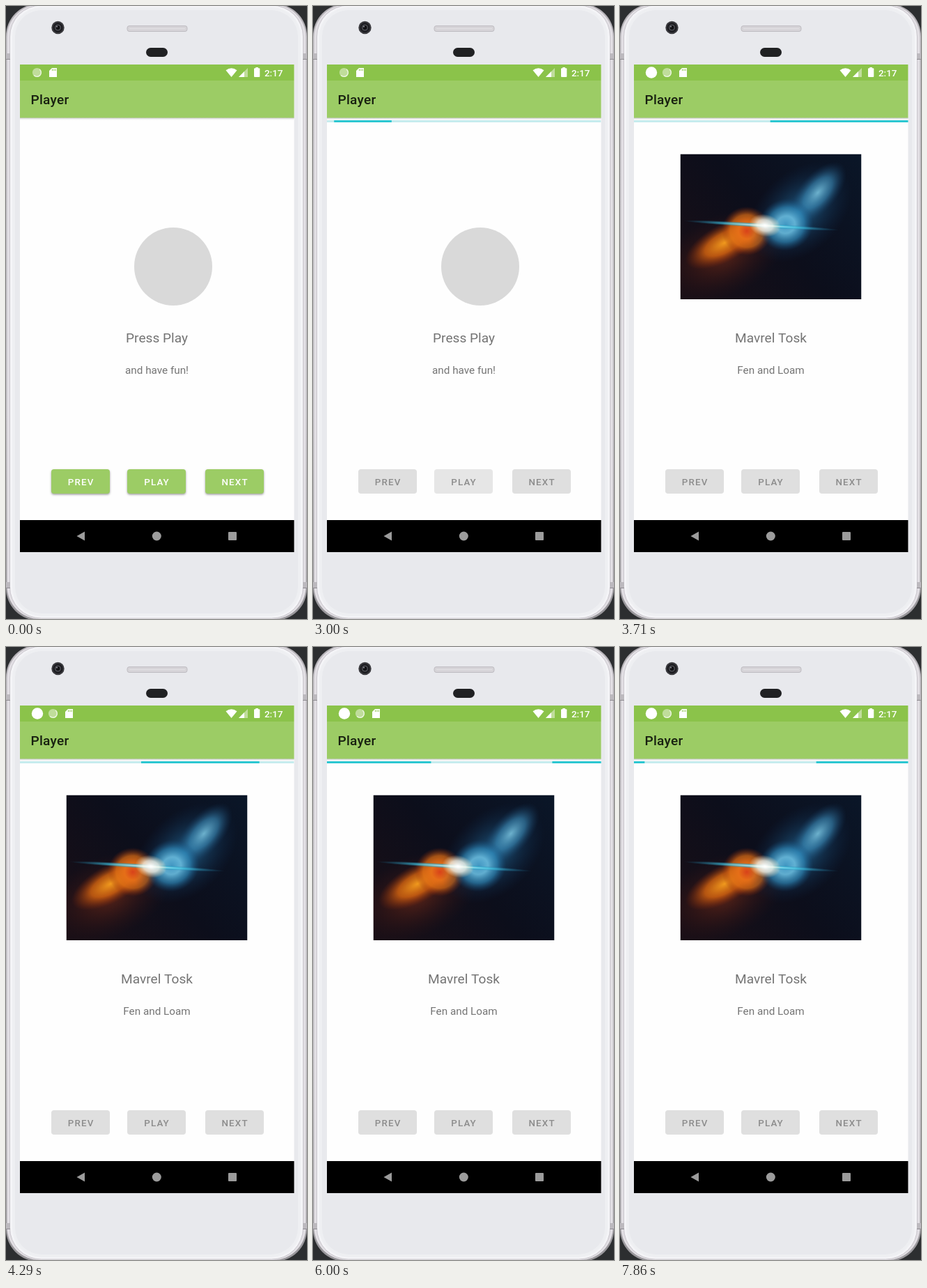
Animation of 432x880 px, one loop 8 s. Source, as an HTML page with a canvas:

```html
<!DOCTYPE html>
<html lang="en">
<head>
<meta charset="utf-8">
<title>Player</title>
<style>
  html, body { margin: 0; width: 100%; height: 100%; overflow: hidden; background: #2c2e30; }
  canvas { display: block; width: 432px; height: 880px; }
</style>
</head>
<body>
<canvas id="stage" width="432" height="880"></canvas>
<script>
const ctx = document.getElementById('stage').getContext('2d');
const LOOP = 8000, LOADING = 3000, LOADED = 3140, NOTICE = 3430;
const LEFT = 20, WIDE = 393.5;
const FONT = 'Roboto, "Noto Sans", sans-serif';

function rect(x, y, w, h, fill) {
  ctx.fillStyle = fill;
  ctx.fillRect(x, y, w, h);
}

function round(x, y, w, h, r, fill, stroke) {
  ctx.beginPath();
  ctx.roundRect(x, y, w, h, r);
  ctx.fillStyle = fill;
  ctx.fill();
  if (stroke) { ctx.strokeStyle = stroke; ctx.lineWidth = 1; ctx.stroke(); }
}

function disc(x, y, r, fill) {
  ctx.beginPath();
  ctx.arc(x, y, r, 0, Math.PI * 2);
  ctx.fillStyle = fill;
  ctx.fill();
}

function poly(fill, ...pts) {
  ctx.beginPath();
  for (let i = 0; i < pts.length; i += 2) ctx.lineTo(pts[i], pts[i + 1]);
  ctx.closePath();
  ctx.fillStyle = fill;
  ctx.fill();
}

function text(str, x, y, size, fill, { weight = 400, align = 'center', spacing = 0 } = {}) {
  ctx.font = `${weight} ${size}px ${FONT}`;
  ctx.letterSpacing = spacing + 'px';
  ctx.textAlign = align;
  ctx.fillStyle = fill;
  ctx.fillText(str, x + spacing / 2, y);
  ctx.letterSpacing = '0px';
}

function blend(gradient, ...stops) {
  stops.forEach((c, i) => gradient.addColorStop(i / (stops.length - 1), c));
  return gradient;
}

// Soft elliptical light
function glow(x, y, rx, ry, turn, ...stops) {
  ctx.save();
  ctx.translate(x, y);
  ctx.rotate(turn);
  ctx.scale(rx, ry);
  disc(0, 0, 1, blend(ctx.createRadialGradient(0, 0, 0, 0, 0, 1), ...stops));
  ctx.restore();
}

const bez = (a, b, c, d, s) => {
  const q = 1 - s;
  return a * q * q * q + 3 * b * q * q * s + 3 * c * q * s * s + d * s * s * s;
};

// Easing made of joined cubic pieces: x,y of start, then two handles and an end per piece
function curve(...p) {
  return x => {
    let i = 0;
    while (i + 8 < p.length && x > p[i + 6]) i += 6;
    let lo = 0, hi = 1;
    for (let n = 0; n < 24; n++) {
      const mid = (lo + hi) / 2;
      if (bez(p[i], p[i + 2], p[i + 4], p[i + 6], mid) < x) lo = mid; else hi = mid;
    }
    return bez(p[i + 1], p[i + 3], p[i + 5], p[i + 7], lo);
  };
}

function through(v, ...stops) {
  let i = 0;
  while (i + 4 < stops.length && v > stops[i + 2]) i += 2;
  const k = (v - stops[i]) / (stops[i + 2] - stops[i]);
  return stops[i + 1] + (stops[i + 3] - stops[i + 1]) * k;
}

const moveA = curve(0, 0, .067, 0, .133, 0, .2, 0, .3958, 0, .4748, .2068, .5915, .4171,
  .7152, .6394, .8163, .9746, 1, 1);
const sizeA = curve(0, 0, .12, 0, .24, 0, .3665, 0, .4725, .0624, .6154, .5, .6833, .5,
  .7548, .5, .7573, .8145, 1, 1);
const moveB = curve(0, 0, .0375, 0, .1288, .0895, .25, .2186, .3224, .2956, .4367, .4176,
  .4833, .4898, .69, .8097, .7933, .95, 1, 1);
const sizeB = curve(0, 0, .0683, .0199, .1922, .1586, .3333, .3493, .3841, .4148, .5495, .6814,
  .6667, .6828, .7526, .6818, .7373, .8789, 1, 1);

function progress(t) {
  const phase = (t / 2000 + .6395) % 1;
  const y = 164, h = 3;
  const bar = (center, scale) => {
    const w = scale * .8 * WIDE;
    rect(LEFT + center * WIDE - w / 2, y, w, h, '#2cc7d1');
  };
  ctx.save();
  ctx.beginPath();
  ctx.rect(LEFT, y, WIDE, h);
  ctx.clip();
  rect(LEFT, y, WIDE, h, '#c6ecee');
  bar(-.9517 + 2.0061 * moveA(phase), through(sizeA(phase), 0, .1, .5, .827, 1, .1));
  bar(-.0489 + 1.7228 * moveB(phase), through(sizeB(phase), 0, .1, .3493, .612, .6828, .935, 1, .1));
  ctx.restore();
}

function phone() {
  rect(0, 0, 432, 880, '#2c2e30');
  const rim = blend(ctx.createLinearGradient(0, 0, 0, 880), '#b4b1b6', '#bdbabf', '#bdbabf', '#98969a');
  round(0, -3, 432, 885, 46, rim);
  round(1.5, -2, 429, 882, 47, '#e2dfe4');
  round(5.5, -1, 421, 880, 45, '#f4f4f7', '#c9c6cc');
  round(9, 2, 414, 874, 42, '#eeeff2');
  round(13, 6, 406, 866, 38, '#e8e9ed');
  for (const y of [68, 827]) {
    for (const x of [0, 426]) {
      rect(x, y, 6, 9, '#bcb9be');
      rect(x, y + 8, 6, 1, '#8f8c92');
    }
  }
  disc(74.5, 31, 9.2, '#3a3a3e');
  disc(74.5, 31, 7, '#1c1c20');
  disc(74.5, 31, 4.6, '#4b4c52');
  disc(74.5, 31, 3, '#111114');
  disc(73, 29.5, 1, '#9a9ca4');
  round(174, 28.5, 86, 8, 3, '#d6d4d8', '#bebcc1');
  rect(177, 32, 80, 1, '#e2e0e4');
  round(201, 60, 31, 13, 6.5, '#202123');
}

function sdCard(x) {
  poly('#fff', x + 4, 89, x + 11, 89, x + 11, 102, x, 102, x, 93);
  for (let i = 0; i < 3; i++) rect(x + 4 + i * 2.3, 90.5, 1, 2.5, '#8bc34a');
}

function dial(x) {
  disc(x, 95.5, 6.6, '#c0dd9b');
  ctx.beginPath();
  ctx.arc(x, 95.5, 5.8, -.9, 2.4);
  ctx.lineWidth = 1.3;
  ctx.strokeStyle = '#eef6e4';
  ctx.stroke();
}

function statusBar(notice) {
  rect(LEFT, 84, WIDE, 23, '#8bc34a');
  const dx = notice ? 23 : 0;
  if (notice) disc(45, 95.5, 8.2, '#fff');
  dial(44.5 + dx);
  sdCard(62 + dx);

  ctx.beginPath();
  ctx.moveTo(323.5, 102);
  ctx.lineTo(315.5, 92.3);
  ctx.quadraticCurveTo(323.5, 86.4, 331.5, 92.3);
  ctx.closePath();
  ctx.fillStyle = '#fff';
  ctx.fill();

  poly('#c0dd9b', 334, 102, 347, 102, 347, 89);
  poly('#fff', 334, 102, 342, 102, 342, 94);
  rect(358.3, 88, 3.6, 2, '#fff');
  round(356, 89.3, 8.3, 12.7, 1, '#fff');
  text('2:17', 371, 101, 13.4, '#fff', { weight: 500, align: 'left' });
}

function toolbar() {
  rect(LEFT, 160, WIDE, 4, blend(ctx.createLinearGradient(0, 160, 0, 164), '#bdbdbd', '#ececec', '#fefefe'));
  rect(LEFT, 107, WIDE, 53.5, '#9ccc65');
  text('Player', 35.4, 141, 19.1, '#182010', { weight: 500, align: 'left', spacing: .24 });
}

function cover() {
  const x = 86.5, y = 212.5, w = 260, h = 208.5;
  ctx.save();
  ctx.beginPath();
  ctx.rect(x, y, w, h);
  ctx.clip();
  rect(x, y, w, h, blend(ctx.createLinearGradient(x, y + h, x + w, y), '#1a0f16', '#0c0e1b', '#0a1628'));
  // Embers and fire
  glow(148, 358, 92, 58, -.4, 'rgba(140,50,22,.6)', 'rgba(60,20,20,0)');
  glow(150, 340, 62, 27, -.5, 'rgba(250,160,30,.95)', 'rgba(222,105,15,.75)', 'rgba(140,40,10,0)');
  glow(182, 323, 36, 35, .2, '#d8421a', 'rgba(232,112,24,.95)', 'rgba(225,110,20,.7)', 'rgba(150,40,10,0)');
  // Ice and spray
  glow(258, 296, 86, 58, -.75, 'rgba(40,125,175,.75)', 'rgba(15,50,90,0)');
  glow(284, 268, 54, 27, -.85, 'rgba(125,200,228,.85)', 'rgba(60,140,185,.6)', 'rgba(20,60,100,0)');
  glow(238, 314, 40, 37, -.4, 'rgba(70,160,205,.9)', 'rgba(110,195,230,.85)', 'rgba(50,145,195,.6)', 'rgba(20,80,130,0)');
  // Flare
  glow(203, 315, 112, 3.5, .06, '#dff8ff', 'rgba(60,190,220,.75)', 'rgba(30,120,160,0)');
  glow(208, 315, 23, 16, .2, '#fff', 'rgba(255,250,235,.75)', 'rgba(255,220,170,0)');
  ctx.restore();
}

function button(label, x, fill, active) {
  ctx.save();
  if (active) {
    ctx.shadowColor = 'rgba(0,0,0,.38)';
    ctx.shadowBlur = 3;
    ctx.shadowOffsetY = 1.5;
  }
  round(x, 665, 84, 35, 4, fill);
  ctx.restore();
  text(label, x + 42, 688, 13.37, active ? '#fff' : '#8c8c8c', { weight: 500, spacing: 1.19 });
}

function navBar() {
  rect(LEFT, 738, WIDE, 46, '#000');
  poly('#9c9c9c', 101.5, 761, 113, 754.5, 113, 767.5);
  disc(216.3, 761, 6.5, '#9c9c9c');
  round(319, 755, 12, 12, 1, '#9c9c9c');
}

function draw(t) {
  const loading = t >= LOADING, loaded = t >= LOADED;
  phone();
  rect(LEFT, 84, WIDE, 700, '#fefefe');
  statusBar(t >= NOTICE);
  toolbar();
  if (loading) progress(t);
  if (loaded) cover();
  else disc(240, 374, 56, '#d9d9d9');
  text(loaded ? 'Mavrel Tosk' : 'Press Play', 216.5, 483.3, 19.1, '#747474');
  text(loaded ? 'Fen and Loam' : 'and have fun!', 216.5, 528, 15.28, '#747474');
  const idle = loading ? '#dfdfdf' : '#9ccc65';
  button('PREV', 65, idle, !loading);
  button('PLAY', 174, loading && !loaded ? '#e6e6e6' : idle, !loading);
  button('NEXT', 286, idle, !loading);
  navBar();
}

// The picture advances seven times a second, on a 10 ms grid
const tick = k => Math.round(k * 100 / 7) * 10;

function frame(now) {
  const t = now % LOOP;
  let k = Math.floor(t * .007) + 1;
  while (tick(k) > t) k--;
  draw(tick(k));
  requestAnimationFrame(frame);
}

draw(0);
requestAnimationFrame(frame);
</script>
</body>
</html>
```
